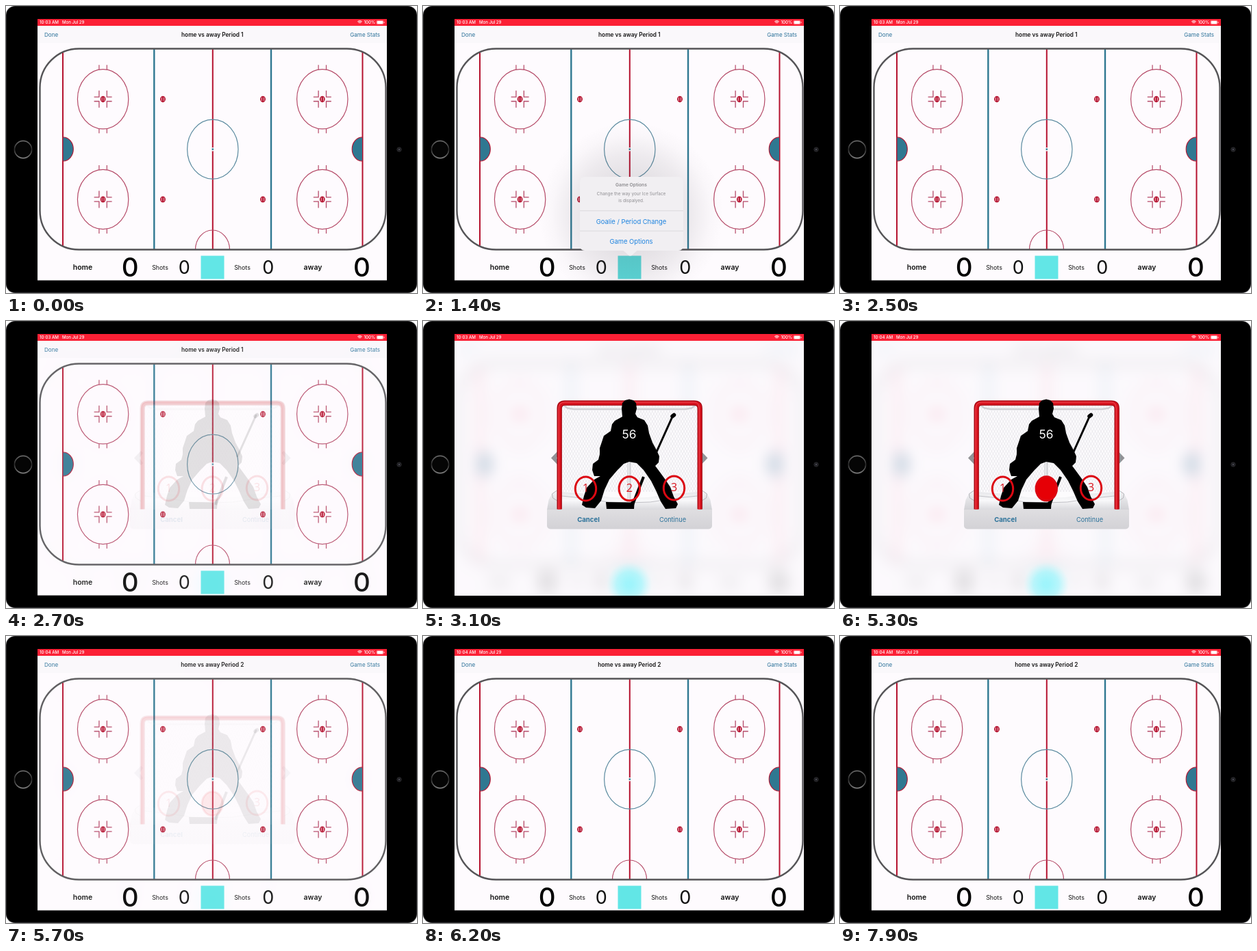
These frames come from a looping animation (600x420 px, 8000 ms). An HTML page with a canvas:

```html
<!DOCTYPE html>
<html lang="en">
<head>
<meta charset="utf-8">
<title>Hockey stats on a tablet</title>
<style>
  html, body { margin: 0; width: 100%; height: 100%; overflow: hidden; background: #fff; }
  canvas { display: block; width: 600px; height: 420px; }
</style>
</head>
<body>
<canvas id="stage" width="600" height="420"></canvas>
<script>
const LOOP = 8000;
const RED = '#b5122f', ROSE = '#b54a68', BLUE = '#2f7891', LINK = '#2a7199';
const MID = 301.5;
const stage = document.getElementById('stage').getContext('2d');
let c = stage;

const ramp = (t, a, b) => {
  const k = Math.min(1, Math.max(0, (t - a) / (b - a)));
  return k * k * (3 - 2 * k);
};
const pulse = (t, a, b, x, y) => ramp(t, a, b) * (1 - ramp(t, x, y));

function text(s, x, y, size, color = '#111', weight = 400, align = 'center', family = 'Inter') {
  c.font = `${weight} ${size}px ${family}, sans-serif`;
  c.textAlign = align;
  c.textBaseline = 'alphabetic';
  c.fillStyle = color;
  c.fillText(s, x, y);
}

function line(color, width, ...p) {
  c.strokeStyle = color;
  c.lineWidth = width;
  c.beginPath();
  for (let i = 0; i < p.length; i += 2) c.lineTo(p[i], p[i + 1]);
  c.stroke();
}

function rect(color, x, y, w, h, r = 0) {
  c.fillStyle = color;
  c.beginPath();
  c.roundRect(x, y, w, h, r);
  c.fill();
}

function oval(x, y, rx, ry, fill, stroke, width = 1.2, from = 0, to = 2 * Math.PI) {
  c.beginPath();
  c.ellipse(x, y, rx, ry, 0, from, to);
  if (fill) { c.fillStyle = fill; c.fill(); }
  if (stroke) { c.strokeStyle = stroke; c.lineWidth = width; c.stroke(); }
}

function poly(color, p) {
  c.fillStyle = color;
  c.beginPath();
  for (let i = 0; i < p.length; i += 2) c.lineTo(p[i], p[i + 1]);
  c.closePath();
  c.fill();
}

function vertical(y0, y1, ...colors) {
  const g = c.createLinearGradient(0, y0, 0, y1);
  colors.forEach((col, i) => g.addColorStop(i / (colors.length - 1), col));
  return g;
}

function tablet() {
  c.fillStyle = '#fff';
  c.fillRect(0, 0, 600, 420);
  rect('#2b2b2d', 0, 0, 600, 420, 13);
  rect('#000', 0.8, 0.8, 598.4, 418, 12.5);
  oval(25, 210, 12.6, 12.6, '#050505', vertical(197, 223, '#6a6a6a', '#2c2c2c', '#808080'), 1.6);
  oval(574, 210, 3.2, 3.2, '#1c1c1f', '#303034', 0.8);
  oval(574, 210, 1.2, 1.2, '#4a4a55');
}

function statusBar(clock) {
  rect('#fb2035', 46, 19, 510, 10);
  text(clock, 49, 26.4, 6.2, '#fff', 500, 'left');
  text('Mon Jul 29', 82, 26.4, 6.1, '#fff', 500, 'left');
  for (const r of [1.6, 3.2, 4.6]) {
    oval(516.5, 26.2, r, r, null, '#fff', 1, -Math.PI * 0.75, -Math.PI * 0.25);
  }
  text('100%', 539, 26.4, 6.1, '#fff', 500, 'right');
  c.strokeStyle = '#ffc4c9';
  c.lineWidth = 0.6;
  c.beginPath();
  c.roundRect(541, 21.4, 10, 5.2, 1.4);
  c.stroke();
  rect('#fff', 541.7, 22.1, 8.6, 3.8, 0.8);
  rect('#fff', 551.6, 23.2, 0.8, 1.7);
}

function dot(x, y) {
  oval(x, y, 3.9, 4.6, RED);
  line('#f3d5dc', 0.9, x - 1.6, y - 2.6, x - 1.6, y + 2.6);
  line('#f3d5dc', 0.9, x + 1.6, y - 2.6, x + 1.6, y + 2.6);
}

function faceoff(x, y) {
  oval(x, y, 37.2, 43.6, null, ROSE);
  for (const sx of [-1, 1]) for (const sy of [-1, 1]) {
    const px = x + sx * 5.7;
    line(ROSE, 1.2, px, y + sy * 43, px, y + sy * 50);
    line(ROSE, 1.3, px, y + sy * 12.5, px, y + sy * 3.2, x + sx * 13, y + sy * 3.2);
  }
  dot(x, y);
}

function rink() {
  c.save();
  c.beginPath();
  c.roundRect(49.5, 62.5, 505, 294, 57);
  c.clip();
  line(RED, 2, 83, 62, 83, 357);
  line(RED, 2, 520.5, 62, 520.5, 357);
  line(BLUE, 2.4, 216.3, 62, 216.3, 357);
  line(BLUE, 2.4, 387, 62, 387, 357);
  line(RED, 2, MID + 0.3, 62, MID + 0.3, 357);
  oval(MID, 356.5, 25, 28.5, null, ROSE);
  c.restore();
  oval(83.5, 209.5, 14.8, 17.5, BLUE, RED, 1.1, -Math.PI / 2, Math.PI / 2);
  oval(520, 209.5, 14.8, 17.5, BLUE, RED, 1.1, Math.PI / 2, Math.PI * 1.5);
  oval(MID + 0.3, 209.7, 37.2, 43.5, null, '#5c8ba0');
  oval(MID + 0.3, 209.7, 1.9, 2.8, '#fff');
  oval(MID + 0.3, 209.7, 1.4, 1.4, BLUE);
  for (const y of [136.3, 283]) {
    faceoff(141.6, y);
    faceoff(461.8, y);
    dot(229, y);
    dot(375, y);
  }
  c.strokeStyle = '#555457';
  c.lineWidth = 2.4;
  c.beginPath();
  c.roundRect(49.5, 62.5, 505, 294, 57);
  c.stroke();
}

function gameScreen(period, dim = 0) {
  rect('#fefbfe', 46, 29, 510, 372.5);
  rect('#faf8fb', 46, 29, 510, 25);
  text('Done', 56, 44.6, 8.1, LINK, 400, 'left');
  text('home vs away Period ' + period, 301.3, 44.6, 8.25, '#151515', 600);
  text('Game Stats', 546, 44.6, 8.05, LINK, 400, 'right');
  rink();
  text('home', 112, 386.3, 10.5, '#111', 600);
  text('away', 448, 386.3, 10.5, '#111', 600);
  text('0', 181.3, 396.3, 38.5, '#000', 500);
  text('0', 519.5, 396.3, 38.5, '#000', 500);
  for (const [label, num] of [[225, 260.3], [345, 382.8]]) {
    text('Shots', label, 385.8, 8.8);
    text('0', num, 392.2, 27, '#111');
  }
  rect(`rgb(${98 - 8 * dim}, ${230 - 12 * dim}, ${230 - 12 * dim})`, 284.5, 365.5, 34, 34);
}

function popover(alpha) {
  if (!alpha) return;
  c.save();
  c.beginPath();
  c.rect(46, 29, 510, 372.5);
  c.clip();
  c.globalAlpha = alpha;
  const g = c.createRadialGradient(304, 305, 40, 304, 305, 135);
  g.addColorStop(0, 'rgba(70,65,75,.17)');
  g.addColorStop(0.5, 'rgba(70,65,75,.09)');
  g.addColorStop(0.8, 'rgba(70,65,75,.025)');
  g.addColorStop(1, 'rgba(70,65,75,0)');
  c.fillStyle = g;
  c.fillRect(46, 160, 510, 242);
  rect('#f1eff2', 229, 250, 151, 108, 7);
  poly('#f1eff2', [292, 357.5, 301, 365.5, 304, 365.5, 313, 357.5]);
  text('Game Options', 304, 264, 6.7, '#8b8a8e', 600);
  text('Change the way your Ice Surface', 304, 277.4, 6.4, '#8f8e92');
  text('is dispalyed.', 304, 287.3, 6.4, '#8f8e92');
  line('#d3d1d5', 0.7, 229, 299.7, 380, 299.7);
  line('#d3d1d5', 0.7, 229, 329.2, 380, 329.2);
  text('Goalie / Period Change', 304, 318.8, 9.4, '#1d83df');
  text('Game Options', 304, 347.5, 9.4, '#1d83df');
  c.restore();
}

function net() {
  rect('#fcfbfd', 201, 122, 202, 154);
  c.save();
  c.beginPath();
  c.rect(202, 123, 200, 127);
  c.clip();
  for (let x = 60; x < 410; x += 4.2) {
    line('#e0dfe3', 0.55, x, 122, x + 75, 252);
    line('#e0dfe3', 0.55, x + 75, 122, x, 252);
  }
  c.restore();
  line('#cfcfd3', 2.4, 206, 124, 211, 127.5, 220, 129, 383, 129, 392, 127.5, 397, 124);
  for (const s of [-1, 1]) {
    const at = d => MID + s * d;
    poly(vertical(246, 276, '#f6f6f8', '#d2d2d6'),
      [at(104), 247, at(113), 252, at(118), 262, at(120.5), 276, at(104), 276]);
    line('#b4b4b9', 1, at(106), 248, at(113), 253, at(112), 259, at(104), 264);
    poly(vertical(249, 276, '#e6e6e9', '#f8f8fa', '#dadade'),
      [at(99), 250, at(60), 253, at(28), 258, at(0), 259, at(0), 276, at(99), 276]);
    line('#bcbcc1', 0.9, at(99), 256, at(70), 259, at(30), 265, at(0), 266);
  }
  rect('#d0d0d4', 298.5, 206, 5, 60);
  line('#f4f4f6', 1.5, 300.5, 206, 300.5, 266);
  c.lineJoin = 'round';
  for (const [col, w, o] of [['#a50c16', 7.4, 0], ['#d8121d', 4.8, 0], ['#ee4a54', 1, -1]]) {
    c.strokeStyle = col;
    c.lineWidth = w;
    c.beginPath();
    c.moveTo(199.2 + o, 275.5);
    c.lineTo(199.2 + o, 128);
    c.quadraticCurveTo(199.2 + o, 120 + o, 207, 120 + o);
    c.lineTo(396, 120 + o);
    c.quadraticCurveTo(404.2 + o, 120 + o, 404.2 + o, 128);
    c.lineTo(404.2 + o, 275.5);
    c.stroke();
  }
}

function goalie() {
  const k = '#000';
  c.lineCap = 'round';
  line(k, 3, 365, 138, 338, 198);
  line(k, 5.5, 364, 139.5, 366.5, 137.5);
  c.lineCap = 'butt';
  line(k, 4, 306, 269, 322, 228);
  poly(k, [267, 265, 303, 265.5, 309, 260, 308, 275, 268, 275]);
  poly(k, [
    290, 128, 291, 120, 295, 116, 301, 114.5, 307, 116, 311, 120, 312, 128, 310, 136,
    313, 141, 323, 145, 328, 153, 330, 164, 335, 178, 341, 189, 345, 198, 344, 207, 339, 212,
    345, 220, 353, 231, 361, 243, 366, 257, 372, 268, 369, 274, 354, 275,
    347, 264, 340, 248, 333, 234, 322, 218, 312, 208, 301, 206, 293, 209,
    284, 218, 272, 232, 265, 247, 260, 263, 251, 274, 238, 273, 232, 269,
    235, 256, 239, 244, 250, 232, 259, 227, 250, 227, 247, 218, 248, 209, 256, 203,
    258, 195, 258, 186, 264, 168, 274, 161, 276, 151, 280, 146, 291, 140
  ]);
  text('56', 301, 172.3, 17.3, '#fff');
}

function target(n, x, y, on) {
  oval(x, y, 15.2, 17.5, on ? '#e60006' : null, '#dc0812', 3);
  if (!on) text(n, x, y + 4.7, 16, '#d8141d', 400, 'center', '"Open Sans"');
}

function chevron(x, s) {
  poly('#929296', [x, 200.5, x + s * 10, 190, x + s * 13, 193, x + s * 8, 200.5, x + s * 13, 208, x + s * 10, 211]);
}

function makeBlur() {
  const base = document.createElement('canvas');
  const out = document.createElement('canvas');
  base.width = out.width = 600;
  base.height = out.height = 420;
  c = base.getContext('2d');
  rect('#fefbfe', 0, 0, 600, 420);
  gameScreen(1);
  c = out.getContext('2d');
  c.filter = 'blur(11px) saturate(1.5)';
  c.drawImage(base, 0, 0);
  c.filter = 'none';
  c.fillStyle = 'rgba(251,249,252,.66)';
  c.fillRect(0, 0, 600, 420);
  const g = c.createRadialGradient(301, 386, 4, 301, 386, 33);
  g.addColorStop(0, 'rgba(150,244,252,.8)');
  g.addColorStop(0.5, 'rgba(160,244,252,.6)');
  g.addColorStop(1, 'rgba(190,246,252,0)');
  c.fillStyle = g;
  c.fillRect(265, 350, 75, 70);
  c = stage;
  return out;
}
const blurred = makeBlur();

function dialog(alpha, picked) {
  if (!alpha) return;
  c.save();
  c.globalAlpha = alpha;
  c.drawImage(blurred, 46, 29, 510, 372.5, 46, 29, 510, 372.5);
  chevron(187, 1);
  chevron(415.5, -1);
  net();
  goalie();
  target('1', 237.5, 245.5, false);
  target('2', 301.3, 245.3, picked);
  target('3', 366.5, 244.5, false);
  rect(vertical(276, 304, '#dfdee1', '#d3d2d6'), 181, 276, 241, 28.5, [0, 0, 5, 5]);
  text('Cancel', 241.5, 294, 9.6, LINK, 700);
  text('Continue', 364.5, 294, 9.2, LINK);
  c.restore();
}

function draw(t) {
  const pop = pulse(t, 1000, 1200, 2000, 2250);
  const modal = pulse(t, 2650, 2900, 5450, 5750);
  tablet();
  gameScreen(t < 5400 ? 1 : 2, pop);
  popover(pop);
  dialog(modal, t >= 4500);
  statusBar(t < 4300 ? '10:03 AM' : '10:04 AM');
}

const start = performance.now();
function tick(now) {
  draw(Math.max(0, now - start) % LOOP);
  requestAnimationFrame(tick);
}
draw(0);
requestAnimationFrame(tick);
</script>
</body>
</html>
```
